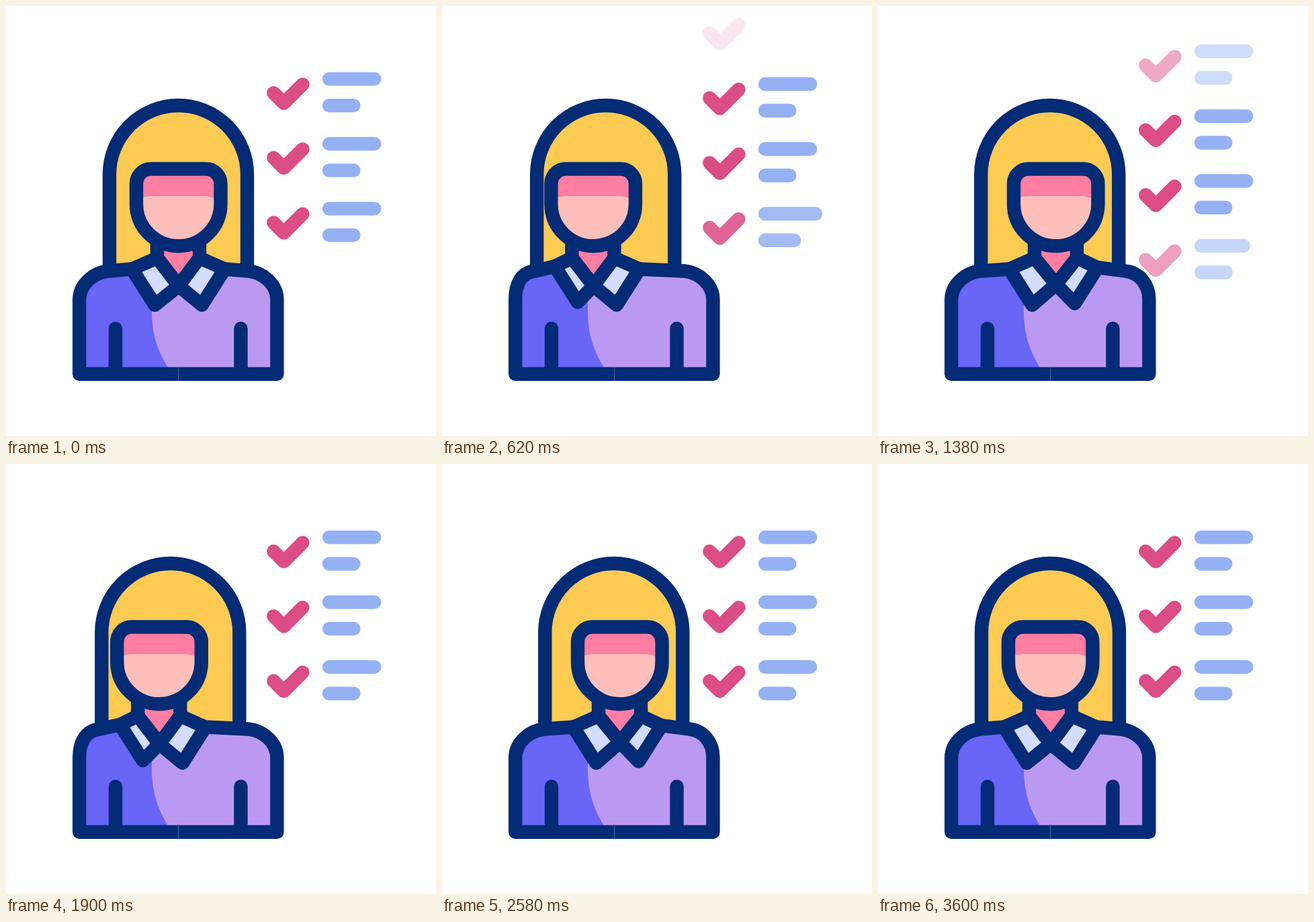
An HTML page that plays this animation: 640x640 px, repeating every 3.62 s.

```html
<!DOCTYPE html>
<html lang="en">
<head>
<meta charset="utf-8">
<title>Checklist</title>
<style>
html, body { margin: 0; width: 100%; height: 100%; overflow: hidden; background: #fff; }
svg { display: block; width: 100vw; height: 100vh; }
path { stroke-linejoin: round; }
.line { stroke: #032b76; stroke-width: 20.4; fill: none; }
.check, .bar { stroke-width: 20.4; stroke-linecap: round; fill: none; }
.check { stroke: #dc4c85; }
.bar { stroke: #94b1f4; }
</style>
</head>
<body>
<svg viewBox="0 0 640 640">
  <g id="list"></g>
  <g id="hair">
    <path class="line" style="fill:#fdca52" d="M154 391V250.5A102.5 102.5 0 0 1 359 250.5V391"/>
  </g>
  <path id="neck" class="line" style="fill:#ff7ea1"/>
  <path id="blue" fill="#6865f7"/>
  <path id="lilac" fill="#bb99f2"/>
  <path id="outline" class="line"/>
  <path class="line" stroke-linecap="round" d="M163 480V545M349.5 480V545"/>
  <path d="M256.5 538V558" stroke="#b9bedb" stroke-width=".7" opacity=".6"/>
  <path id="collar" class="line" style="fill:#d3dcfd"/>
  <g id="face">
    <path fill="#ff7ea1" d="M194 264Q194 242.5 216 242.5H298Q319.5 242.5 319.5 264V296H194Z"/>
    <path fill="#fdbfb9" d="M194 294.5V288Q206 283 217 283H297Q306 283 319.5 292V294.5A62.75 62.75 0 0 1 194 294.5Z"/>
    <path class="line" d="M194 264.5A22 22 0 0 1 216 242.5H297.5A22 22 0 0 1 319.5 264.5V294.5A62.75 62.75 0 0 1 194 294.5Z"/>
  </g>
</svg>
<script>
const LOOP = 3620;
const SCROLL = 460, scrollStarts = [238, 1173, 2013, 2940];
const TOP = 108.6, PITCH = 96.5, TRAVEL = 96;

// Each turn of the head: start time and the offset it ends at.
const TURN = 540, LEFT = -31.6, RIGHT = 8;
const turns = [[80, LEFT], [760, RIGHT], [1450, LEFT], [2030, RIGHT], [2590, LEFT], [3060, 0]];

const $ = id => document.getElementById(id);
const clamp = k => Math.min(1, Math.max(0, k));
const smooth = k => k * k * (3 - 2 * k);
const stretch = (u, power) => u ** power + .6 * Math.sin(Math.PI * u);
const setPath = (el, d) => el.setAttribute('d', d);
const move = (el, x, y) => el.setAttribute('transform', `translate(${x} ${y})`);

function add(parent, tag, cls = '') {
  const el = document.createElementNS('http://www.w3.org/2000/svg', tag);
  el.setAttribute('class', cls);
  parent.append(el);
  return el;
}

function makeRow() {
  const g = add($('list'), 'g');
  const check = add(g, 'path', 'check'), bars = add(g, 'path', 'bar');
  setPath(check, 'M398.3 20.8L413.5 36L441.5 8');
  return { g, check, bars };
}
const rows = Array.from({ length: 4 }, makeRow);

function drawBars(el, long, short) {
  const end = (width, k) => Math.max(481.01, 461 + width * k);
  setPath(el, `M481 0H${end(87.3, long)}M481 39.5H${end(56.4, short)}`);
}

function drawList(t) {
  const start = scrollStarts.findLast(s => s <= t) ?? scrollStarts[0];
  const u = clamp((t - start) / SCROLL);
  const fade = u ** .8;
  rows.forEach(({ g, check, bars }, i) => {
    const leaving = i === 0, entering = i === 3;
    move(g, 0, TOP + PITCH * i - TRAVEL * smooth(u));
    check.style.opacity = leaving ? 1 - fade : entering ? fade : 1;
    bars.style.opacity = leaving ? clamp(1 - 1.2 * u) : entering ? fade : 1;
    drawBars(bars, entering ? stretch(u, 1.3) : 1, entering ? stretch(u, 1.1) : 1);
  });
}

function headOffset(t) {
  let from = 0, h = 0;
  for (const [start, to] of turns) {
    h += (to - from) * smooth(clamp((t - start) / TURN));
    from = to;
  }
  return h;
}

function drawPerson(t) {
  const h = headOffset(t);
  move($('face'), h, 0);
  move($('hair'), h < 0 ? h * .406 : -h * .09, 0);

  // The collar on the side being faced lags behind and lifts.
  const outL = Math.max(h, h * .62), outR = Math.min(h, h * .15);
  const liftL = (outL - h) / 3, liftR = (h - outR) / 3;
  const neckL = `${225 + h} 375`, neckR = `${288 + h} 375`;
  const centre = `${257 + h} ${416.5 - liftR}`;
  const edgeL = `${187.5 + outL} ${391.5 - liftL}`, edgeR = `${325.5 + outR} ${391.5 - liftR}`;
  const tipL = `${221.5 + outL} ${445 - liftL}`, tipR = `${291.5 + outR} ${445 - liftR}`;
  const shoulderL = 152 - 3.4 * liftL, shoulderR = 361 + 3 * liftR;

  const left = `M256.5 547.8H109.2V437C109.2 414 ${shoulderL - 21} 396.5 ${shoulderL} 394.5L${edgeL}`;
  const right = `L${edgeR}L${shoulderR} 394.5C${shoulderR + 21} 396.5 403.4 414 403.4 437V547.8`;
  setPath($('neck'), `M${225 + h} 345L${neckL}L${centre}L${neckR}V345`);
  setPath($('blue'), `${left}L${centre}${right}Z`);
  setPath($('lilac'), `M${centre}${right}H247L241 538C227 516 217 490 217 455V440Z`);
  setPath($('outline'), `${left}M${edgeR}${right}H256`);
  setPath($('collar'), `M${edgeL}L${neckL}L${centre}L${tipL}ZM${edgeR}L${neckR}L${centre}L${tipR}Z`);
}

function frame() {
  const t = performance.now() % LOOP;
  drawList(t);
  drawPerson(t);
  requestAnimationFrame(frame);
}
frame();
</script>
</body>
</html>
```
